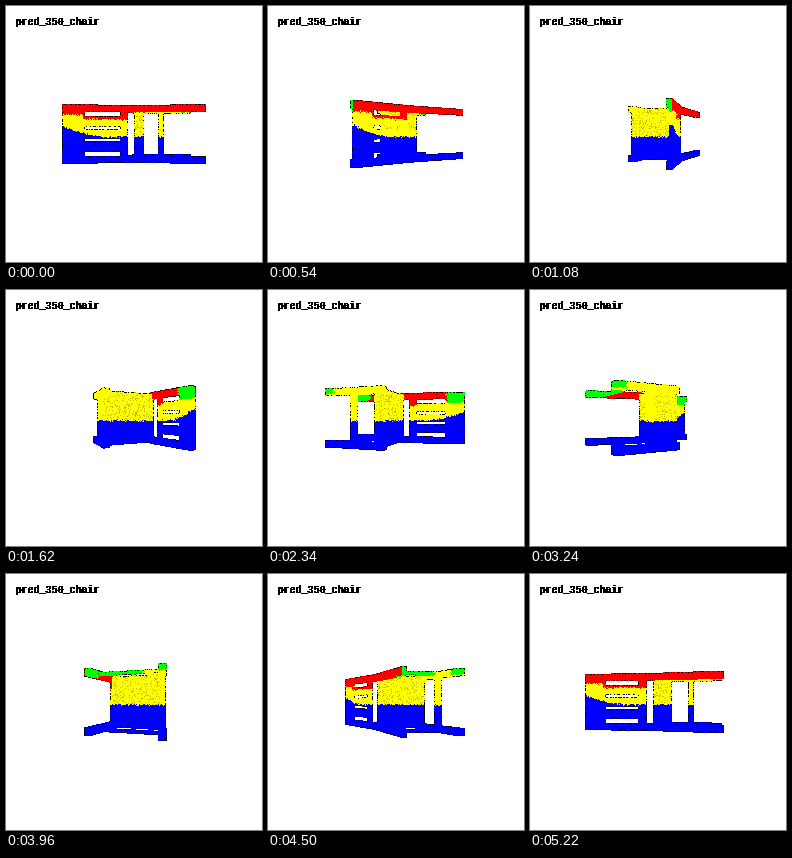
Write a matplotlib script that moves like this. It is 256 px wide and 256 px high and loops after 5.4 s.

```python
import numpy as np
import matplotlib.pyplot as plt
from matplotlib.animation import FuncAnimation

SIZE, DPI = 256, 100
FRAMES, STEP_MS = 30, 180
CAM = 255.0          # camera distance
MID = 128            # screen centre
STEP = 0.5           # surface sample spacing
BLACK, RED, YELLOW, GREEN, BLUE, OLIVE, WHITE = range(7)
PALETTE = np.array([[0, 0, 0], [255, 0, 0], [255, 255, 0], [0, 255, 0],
                    [0, 0, 255], [190, 190, 0], [255, 255, 255]], np.uint8)
rng = np.random.default_rng(7)


def box(h, d, w):
    """Sample the six faces of a box given as (low, high) per axis."""
    spans = (h, d, w)
    axes = [np.linspace(a, b, int((b - a) / STEP) + 2) for a, b in spans]
    parts = []
    for k in range(3):
        for end in spans[k]:
            sides = list(axes)
            sides[k] = np.array([end])
            grid = np.meshgrid(*sides, indexing="ij")
            parts.append(np.stack([g.ravel() for g in grid], 1))
    return np.concatenate(parts)


def mirrored(h, d, w):
    return [box(h, d, w), box(h, d, (-w[1], -w[0]))]


def blue_edge(h, back):
    rise = np.clip((-h - 20) / 43, 0, 1) ** 2
    return -2.5 + np.where(back, 10 * rise, 0)


def paint(p, kind):
    h, d, w = p.T
    jitter = rng.normal(0, 0.6, len(p))
    color = np.full(len(p), YELLOW)
    if kind == "back":
        rear = d < -23.8
        low = np.where((h > -45) & (h < -5), 14, 18.5)
        low = np.where(rear, low, 18.5 - 5 * np.clip((h + 25) / 15, 0, 1))
        color[w + jitter > low] = RED
        color[(w > 17) & (np.abs(h) + 2 * jitter > 46) & ~rear] = GREEN
    elif kind == "front":
        color[(h + 2 * jitter > 53) & (w + jitter > 22.5)] = GREEN
    elif kind == "side":
        color[d + 3 * jitter < 12] = GREEN
    elif kind == "seat":
        color[rng.random(len(p)) < 0.14] = OLIVE
    below = w + jitter < blue_edge(h, kind == "back")
    color[below] = BLUE
    return color


def build():
    back = mirrored((-62.5, 62.5), (-24, -19.5), (21, 27.2))
    back.append(box((-62.5, -44), (-24, -22), (-21, 21)))
    back.append(box((-12.5, -6), (-24, -22.5), (-21, 21)))
    for mid in (-11.8, 0, 11.8):
        back.append(box((-44, -12.5), (-24, -22.5), (mid - 4.3, mid + 4.3)))
    front = mirrored((-2, 62.5), (25, 31), (21.4, 27.2))
    front.append(box((27.5, 33), (27, 31), (-21.4, 21.4)))
    side = mirrored((43, 46), (-28, 26), (23, 25.5))
    seat = [box((0, 9), (-20.5, 29), (-25.2, 25.2))]

    points, colors = [], []
    groups = dict(back=back, front=front, side=side, seat=seat)
    for kind, parts in groups.items():
        p = np.concatenate(parts)
        colors.append(paint(p, kind))
        if kind == "back":
            p[:, 1] -= 7.5 * np.abs(p[:, 0]) / 63   # bent rear legs
        p[:, 2] *= 1 + 0.0018 * p[:, 1]             # wider at the front
        points.append(p)
    return np.concatenate(points), np.concatenate(colors)


POINTS, COLORS = build()
DOTS = rng.random((SIZE, SIZE)) < 0.5


def render(i):
    a = 2 * np.pi * i / FRAMES
    h, d, w = POINTS.T
    x = h * np.cos(a) - d * np.sin(a)
    near = -h * np.sin(a) - d * np.cos(a)
    scale = CAM / (CAM - near)
    px = np.floor(MID + x * scale).astype(int)
    py = np.floor(MID - w * scale).astype(int)
    order = np.argsort(near, kind="stable")
    img = np.full((SIZE, SIZE), WHITE)
    img[py[order], px[order]] = COLORS[order]

    solid = img != WHITE
    inside = solid.copy()
    for axis in (0, 1):
        for shift in (-1, 1):
            inside &= np.roll(solid, shift, axis)
    img[solid & ~inside & DOTS] = BLACK
    return PALETTE[img]


fig = plt.figure(figsize=(SIZE / DPI, SIZE / DPI), dpi=DPI, facecolor="white")
ax = fig.add_axes([0, 0, 1, 1])
ax.axis("off")
picture = ax.imshow(render(0), interpolation="nearest", aspect="auto",
                    extent=(0, SIZE, SIZE, 0))
# two passes one pixel apart give the heavy bitmap strokes
for left in (9.5, 10.5):
    ax.text(left, 19, "pred_350_chair", family="Liberation Mono",
            weight="bold", size=10 * 72 / DPI, color="black",
            va="baseline", antialiased=False)


def update(i):
    picture.set_data(render(i))
    return [picture]


anim = FuncAnimation(fig, update, frames=FRAMES, interval=STEP_MS,
                     repeat=True, repeat_delay=0)
plt.show()
```
